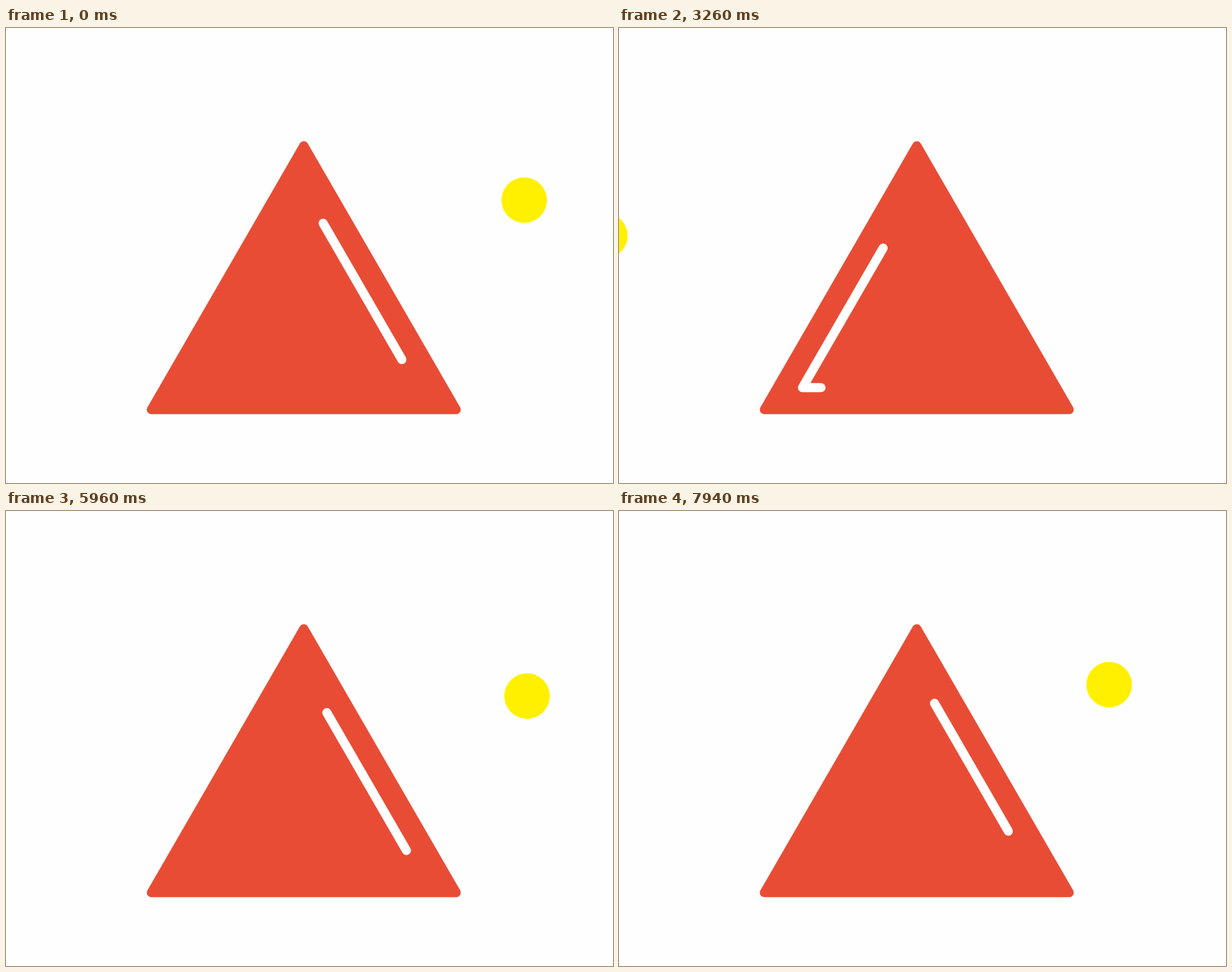
Animation of 800x600 px, one loop 8000 ms. Source, as an HTML page with a canvas:

```html
<!DOCTYPE html>
<html lang="en">
<head>
<meta charset="utf-8">
<title>Sun and triangle</title>
<style>
  html, body { margin: 0; width: 100%; height: 100%; overflow: hidden; background: #fefefe; }
  canvas { display: block; }
</style>
</head>
<body>
<canvas width="800" height="600"></canvas>
<script>
const ctx = document.querySelector('canvas').getContext('2d');
const LOOP = 8000;
const CENTER = { x: 392.5, y: 387.3 };
const OUTER = 232, INNER = 174;   // circumradii of the triangle and of the highlight track
const RAD = Math.PI / 180;

// The sun glides through evenly timed points, in steps, and rests between moves.
// Each move sets out from where the one before it ended.
const home = [683, 227];
const moves = [
  { start: 1020, end: 1920, step: 90, path: [[725, 170], [718, 92], [612, 51], [375, 54]] },
  { start: 2220, end: 3740, step: 80, path: [[145, 130], [5, 250], [-8, 270], [152, 192]] },
  { start: 4140, end: 4560, step: 60, path: [[125, 306], [152, 419], [172, 512], [196, 606]] },
  { start: 4760, end: 4820, step: 60, path: [[236, 660]] },
  { start: 5180, end: 6090, step: 70, path: [[501, 588], [660, 420], [693, 275], [669, 217]] },
  { start: 6440, end: 7220, step: 60, path: [[628, 80], [461, 29], [322, 50], [381, 48]] },
  { start: 7280, end: 7940, step: 60, path: [[545, 90], [669, 230], [675, 300], [646, 229]] }
];
moves.forEach((move, i) => move.path.unshift(i ? moves[i - 1].path.at(-1) : home));

// Catmull-Rom curve, progress from 0 to 1
function along(path, progress) {
  const last = path.length - 1;
  const i = Math.min(Math.floor(progress * last), last - 1);
  const u = progress * last - i, v = 1 - u;
  return [0, 1].map(axis => {
    const slope = k => {
      const before = Math.max(k - 1, 0), after = Math.min(k + 1, last);
      return (path[after][axis] - path[before][axis]) / (after - before);
    };
    return path[i][axis] * (1 + 2 * u) * v * v + path[i + 1][axis] * u * u * (3 - 2 * u) +
      u * v * (slope(i) * v - slope(i + 1) * u);
  });
}

function sunAt(time) {
  const move = moves.filter(m => m.start <= time).pop();
  if (!move) return home;
  const { start, end, step, path } = move;
  const taken = Math.floor((time - start) / step) + 1;
  return along(path, Math.min(taken * step / (end - start + step), 1));
}

function polar(radius, degrees) {
  return [CENTER.x + radius * Math.cos(degrees * RAD), CENTER.y + radius * Math.sin(degrees * RAD)];
}

// Point of the highlight track seen from the center at an angle
function trackPoint(degrees) {
  const fromNormal = ((degrees + 90) % 120 + 120) % 120 - 60;
  return polar(INNER / 2 / Math.cos(fromNormal * RAD), degrees);
}

function trace(points) {
  ctx.beginPath();
  points.forEach(p => ctx.lineTo(...p));
}

// The highlight faces the sun and grows with its distance
function drawHighlight(sunX, sunY) {
  const dx = sunX - CENTER.x, dy = sunY - CENTER.y;
  const angle = Math.atan2(dy, dx) / RAD;
  const half = Math.min(50, 2.45 + 0.1529 * Math.hypot(dx, dy));
  const angles = [angle - half];
  for (let corner = -330; corner < angle + half; corner += 120) {
    if (corner > angle - half) angles.push(corner);
  }
  angles.push(angle + half);
  trace(angles.map(trackPoint));
  ctx.strokeStyle = '#fff';
  ctx.stroke();
}

function draw() {
  const sun = sunAt(performance.now() % LOOP);
  ctx.clearRect(0, 0, 800, 600);
  ctx.lineWidth = 12;
  ctx.lineCap = ctx.lineJoin = 'round';

  trace([-90, 30, 150].map(a => polar(OUTER, a)));
  ctx.closePath();
  ctx.fillStyle = ctx.strokeStyle = '#e94c35';
  ctx.fill();
  ctx.stroke();

  drawHighlight(...sun);

  ctx.beginPath();
  ctx.arc(...sun, 30, 0, 2 * Math.PI);
  ctx.fillStyle = '#fff000';
  ctx.fill();
  requestAnimationFrame(draw);
}
draw();
</script>
</body>
</html>
```
